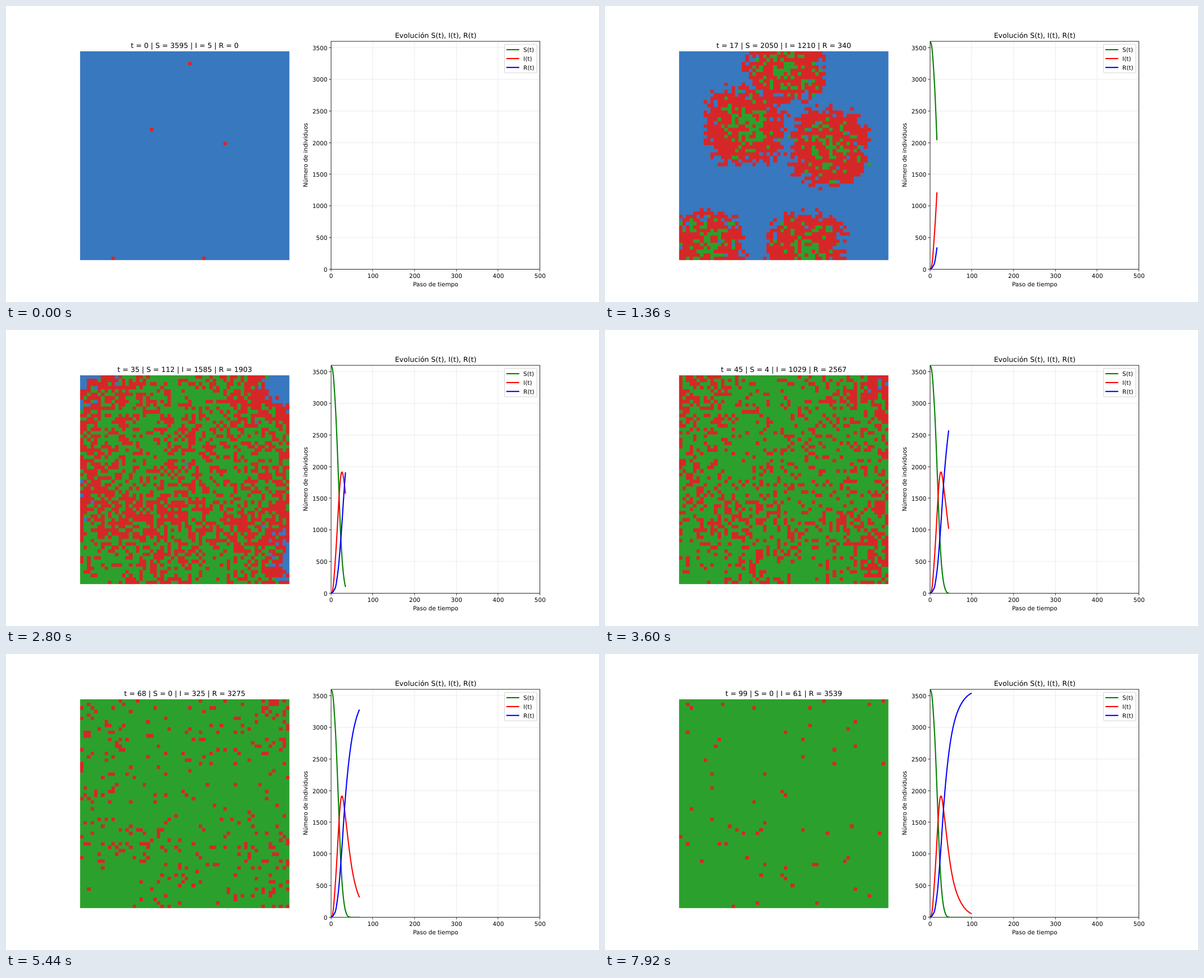
An HTML page with a canvas for the animation above (8 s loop, 1058 by 529 pixels).

```html
<!DOCTYPE html>
<html lang="es">
<head>
<meta charset="utf-8">
<title>Evolución S, I, R</title>
<style>
html, body { margin: 0; width: 100%; height: 100%; overflow: hidden; background: #fff; }
canvas, svg { position: absolute; left: 0; top: 0; width: 1058px; height: 529px; }
text { font-family: "DejaVu Sans", sans-serif; font-size: 13.889px; text-rendering: geometricPrecision; white-space: pre; }
.title { font-size: 16.667px; }
.thin { stroke-width: 1.11; }
.curve { fill: none; stroke-width: 2.78; stroke-linejoin: round; stroke-linecap: square; }
</style>
</head>
<body>
<canvas id="grid" width="1400" height="700"></canvas>
<svg id="plot" viewBox="0 0 1400 700"></svg>
<script>
const N = 60, TOTAL = N * N, STEPS = 100, STEP_MS = 80;
const FIELD = { x: 175, y: 107, size: 494 };
const AXES = { x0: 766.82, x1: 1260, y0: 623, y1: 84 };
const COLORS = { S: '#3778bf', I: '#d62728', R: '#2ca02c' };

// Milestones of the epidemic: [step, S, R]
const KEYS = [[0, 3595, 0], [10, 3070, 77], [17, 2050, 340], [25, 755, 949],
  [35, 112, 1903], [57, 0, 3041], [80, 0, 3423], [99, 0, 3539]];

// First cases: [column, row, drift of the spread in columns, in rows]
const SEEDS = [[31, 3, -1, 0], [20, 22, -1.5, -1], [41, 26, 1.5, 1], [9, 59, -2, -2], [35, 59, 1, -2]];

function randomSource(seed) {
  return () => {
    seed = (seed + 0x6D2B79F5) | 0;
    let r = Math.imul(seed ^ (seed >>> 15), 1 | seed);
    r = (r + Math.imul(r ^ (r >>> 7), 61 | r)) ^ r;
    return ((r ^ (r >>> 14)) >>> 0) / 4294967296;
  };
}

// Monotone cubic through the points, starting flat
function smooth(points) {
  const slope = points.slice(1).map((p, i) => (p[1] - points[i][1]) / (p[0] - points[i][0]));
  const tangent = points.map((p, i) => {
    const a = slope[i - 1], b = slope[i];
    if (i === 0) return 0;
    if (b === undefined) return a;
    return a * b > 0 ? 2 * a * b / (a + b) : 0;
  });
  return t => {
    let i = 0;
    while (i < points.length - 2 && t > points[i + 1][0]) i++;
    const [ta, va] = points[i], [tb, vb] = points[i + 1];
    const h = tb - ta, u = (t - ta) / h, w = 1 - u;
    return va * (1 + 2 * u) * w * w + tangent[i] * h * u * w * w
      + vb * u * u * (3 - 2 * u) - tangent[i + 1] * h * u * u * w;
  };
}

// S falls like exp(-t²) as the fronts grow; the cells not yet recovered decay like exp(-t)
const front = smooth(KEYS.map(([t, S]) => [t, Math.sqrt(-Math.log((S + 0.13) / TOTAL))]));
const decay = smooth(KEYS.map(([t, , R]) => [t, Math.log(TOTAL - R)]));
const counts = Array.from({ length: STEPS }, (_, t) => {
  const S = Math.round(TOTAL * Math.exp(-(front(t) ** 2)) - 0.13);
  const R = TOTAL - Math.round(Math.exp(decay(t)));
  return { S, I: TOTAL - S - R, R };
});

// Step at which each cell falls ill and recovers
const illAt = new Array(TOTAL).fill(Infinity), wellAt = new Array(TOTAL).fill(Infinity);

function spread() {
  const rnd = randomSource(2024);
  const distance = (dx, dy) => Math.cbrt(Math.abs(dx) ** 3 + Math.abs(dy) ** 3);
  const delay = Array.from({ length: TOTAL }, (_, i) => {
    const x = i % N, y = Math.floor(i / N);
    const reach = Math.min(...SEEDS.map(([sx, sy, dx, dy]) => distance(x - sx - dx, y - sy - dy)));
    return reach + 2 * rnd() - 1.4 * Math.log(1 - rnd());
  });
  for (const [x, y] of SEEDS) delay[y * N + x] = -1;
  const order = delay.map((_, i) => i).sort((a, b) => delay[a] - delay[b]);

  const ill = [];
  let reached = 0, recovered = 0;
  for (let t = 0; t < STEPS; t++) {
    for (; recovered < counts[t].R; recovered++) {
      const [cell] = ill.splice(Math.floor(rnd() * ill.length), 1);
      wellAt[cell] = t;
    }
    for (; reached < TOTAL - counts[t].S; reached++) {
      illAt[order[reached]] = t;
      ill.push(order[reached]);
    }
  }
}

const plot = document.getElementById('plot');
function add(tag, attrs, text) {
  const el = document.createElementNS('http://www.w3.org/2000/svg', tag);
  for (const k in attrs) el.setAttribute(k, attrs[k]);
  if (text) el.textContent = text;
  return plot.appendChild(el);
}
function line(x1, y1, x2, y2, stroke) {
  return add('line', { class: 'thin', x1, y1, x2, y2, stroke });
}
function label(x, y, text, anchor = 'middle', more = {}) {
  return add('text', { x, y, 'text-anchor': anchor, ...more }, text);
}

const px = t => AXES.x0 + t / 500 * (AXES.x1 - AXES.x0);
const py = v => AXES.y0 - v / 3600 * (AXES.y0 - AXES.y1);
const snapX = x => Math.round(x) + 0.5;
const snapY = y => Math.round(y) - 0.5;
const midX = (AXES.x0 + AXES.x1) / 2, midY = (AXES.y0 + AXES.y1) / 2;
const SERIES = [['S', '#008000'], ['I', '#ff0000'], ['R', '#0000ff']];

function buildPlot() {
  const x0 = snapX(AXES.x0), x1 = snapX(AXES.x1), y0 = snapY(AXES.y0), y1 = snapY(AXES.y1);
  for (let t = 0; t <= 500; t += 100) {
    const x = snapX(px(t));
    line(x, y0, x, y1, '#e7e7e7');
    line(x, y0, x, y0 + 5, '#000');
    label(px(t) + 0.9, 643.5, String(t));
  }
  for (let v = 0; v <= 3500; v += 500) {
    const y = snapY(py(v));
    line(x0, y, x1, y, '#e7e7e7');
    line(x0 - 5, y, x0, y, '#000');
    label(AXES.x0 - 8.1, Math.round(py(v) + 5), String(v), 'end');
  }
  const box = { x: x0, y: y1, width: x1 - x0, height: y0 - y1 };
  add('clipPath', { id: 'inside' }).appendChild(add('rect', box));
  const curves = SERIES.map(([, stroke]) => add('polyline', { class: 'curve', stroke, 'clip-path': 'url(#inside)' }));
  add('rect', { ...box, class: 'thin', fill: 'none', stroke: '#000' });

  label(midX + 1, 75.7, 'Evolución S(t), I(t), R(t)', 'middle', { class: 'title' });
  label(midX + 1, 663, 'Paso de tiempo');
  label(0, 0, 'Número de individuos', 'middle', { transform: `translate(712.3 ${midY - 1}) rotate(-90)` });

  add('rect', { x: 1177, y: 90.7, width: 76, height: 67.5, rx: 2.8,
    fill: '#fff', 'fill-opacity': 0.8, stroke: '#ccc', 'stroke-opacity': 0.8, 'stroke-width': 1.39 });
  SERIES.forEach(([name, stroke], i) => {
    const y = 103.3 + i * 21;
    add('path', { class: 'curve', stroke, d: `M1182.6 ${y}H1210.4` });
    label(1221.5, y + 5, name + '(t)', 'start');
  });
  return curves;
}

const ctx = document.getElementById('grid').getContext('2d');
const edge = (start, i) => Math.round(start + i * FIELD.size / N);

function drawCells(t) {
  for (let i = 0; i < TOTAL; i++) {
    const col = i % N, row = Math.floor(i / N);
    const x = edge(FIELD.x, col), y = edge(FIELD.y, row);
    ctx.fillStyle = t >= wellAt[i] ? COLORS.R : t >= illAt[i] ? COLORS.I : COLORS.S;
    ctx.fillRect(x, y, edge(FIELD.x, col + 1) - x, edge(FIELD.y, row + 1) - y);
  }
}

spread();
const curves = buildPlot();
const status = label(FIELD.x + FIELD.size / 2, 98.6, '', 'middle', { class: 'title' });
let shown = -1;

function show(t) {
  const { S, I, R } = counts[t];
  drawCells(t);
  status.textContent = `t = ${t} | S = ${S} | I = ${I} | R = ${R}`;
  SERIES.forEach(([name], i) => {
    const past = t ? counts.slice(0, t + 1) : [];
    curves[i].setAttribute('points', past.map((c, k) => `${px(k).toFixed(2)},${py(c[name]).toFixed(2)}`).join(' '));
  });
}

const start = performance.now();
function tick() {
  const t = Math.floor((performance.now() - start) / STEP_MS) % STEPS;
  if (t !== shown) show(shown = t);
  requestAnimationFrame(tick);
}
tick();
</script>
</body>
</html>
```
